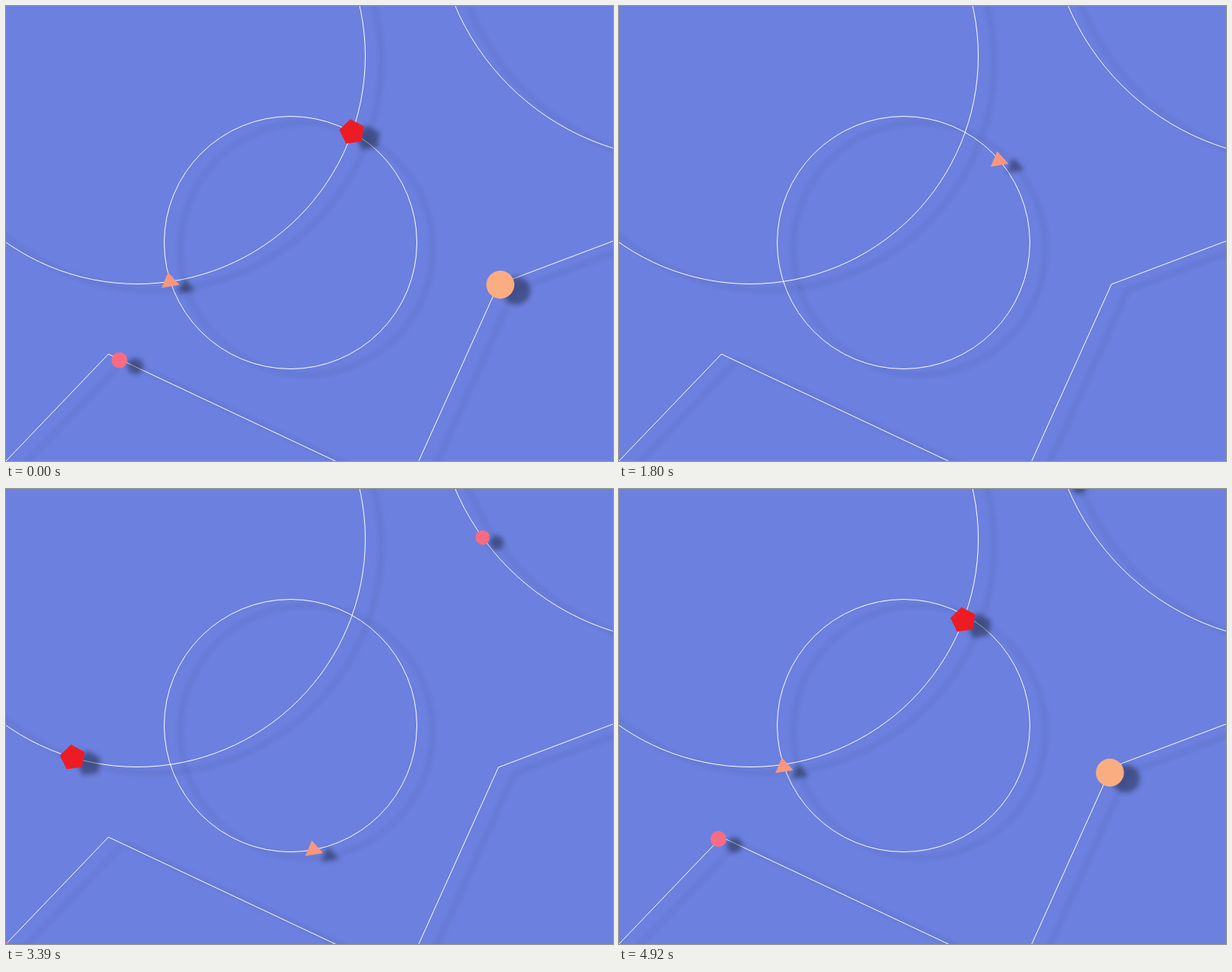
An HTML page with a canvas that plays this animation: 800x600 px, repeating every 4.95 s.

```html
<!DOCTYPE html>
<html lang="en">
<head>
<meta charset="utf-8">
<title>Shapes on paths</title>
<style>
  html, body { margin: 0; width: 100%; height: 100%; overflow: hidden; background: #6b80df; }
  canvas { display: block; }
</style>
</head>
<body>
<canvas width="800" height="600"></canvas>
<script>
const ctx = document.querySelector('canvas').getContext('2d');
const LOOP = 4950, STEP = 30;

const ringA = { x: 375, y: 312, r: 166.5 };
const ringB = { x: 173, y: 66, r: 300.5 };
const ringC = { x: 898.3, y: -130.7, r: 333 };
const leftPath = [[0, 600], [135, 459], [434, 600]];
const rightPath = [[544, 600], [649, 367], [800, 310]];

// Angles in degrees, evenly spaced over one loop
const triangleTurn = [162.1, 230.5, 306.8, 371.5, 432.6, 491.9, 522.1];
const pentagonTurn = [19.5, -36, -112, -183, -247, -303.3, -340.5];

const triangle = [[-2.8, -12], [12, 4.5], [-11.5, 8.5]];
const pentagon = [0, 1, 2, 3, 4].map(i => {
  const a = (i * 72 - 98) * Math.PI / 180;
  return [17.3 * Math.cos(a), 17.3 * Math.sin(a)];
});

// Smooth curve through evenly spaced values
function spline(values, t) {
  const last = values.length - 1;
  const pos = t / LOOP * last, i = Math.floor(pos);
  const u = pos - i, w = 1 - u;
  const slope = j => {
    const a = Math.max(j - 1, 0), b = Math.min(j + 1, last);
    return (values[b] - values[a]) / (b - a);
  };
  return values[i] * w * w * (1 + 2 * u) + values[i + 1] * u * u * (3 - 2 * u)
    + u * w * (slope(i) * w - slope(i + 1) * u);
}

// Steady straight motion: at point a at time t0, at point b at time t1
function glide(a, b, t0, t1, t) {
  const u = (t - t0) / (t1 - t0);
  return [a[0] + (b[0] - a[0]) * u, a[1] + (b[1] - a[1]) * u];
}

function onRing(ring, degrees) {
  const a = degrees * Math.PI / 180;
  return [ring.x + ring.r * Math.cos(a), ring.y + ring.r * Math.sin(a)];
}

// Speeds up slightly, then rests just above the stage
function smallDotAngle(t) {
  const d = Math.min(t, 3780) - 2460;
  return 113.4 + 0.0303 * d + 3.08e-6 * d * d;
}

function setShadow(scale) {
  ctx.shadowColor = 'rgba(0, 0, 0, 0.36)';
  ctx.shadowOffsetX = 21 * scale;
  ctx.shadowOffsetY = 8 * scale;
  ctx.shadowBlur = 6;
}

// Extend the ends so that the shadows run off the stage
function strokePath([a, b, c]) {
  ctx.beginPath();
  ctx.moveTo(...glide(b, a, 0, 1, 1.4));
  ctx.lineTo(...b);
  ctx.lineTo(...glide(b, c, 0, 1, 1.4));
  ctx.stroke();
}

function strokeRing(ring) {
  ctx.beginPath();
  ctx.arc(ring.x, ring.y, ring.r, 0, 2 * Math.PI);
  ctx.stroke();
}

function dot([x, y], r, color) {
  ctx.fillStyle = color;
  ctx.beginPath();
  ctx.arc(x, y, r, 0, 2 * Math.PI);
  ctx.fill();
}

function polygon([x, y], points, color) {
  ctx.fillStyle = color;
  ctx.beginPath();
  points.forEach(([px, py]) => ctx.lineTo(x + px, y + py));
  ctx.fill();
}

function draw(t) {
  const leaving = t < LOOP / 2;

  ctx.shadowColor = 'transparent';
  ctx.fillStyle = '#6b80df';
  ctx.fillRect(0, 0, 800, 600);

  setShadow(1);
  ctx.strokeStyle = '#fff';
  ctx.lineWidth = 1;
  [ringA, ringB, ringC].forEach(strokeRing);
  [leftPath, rightPath].forEach(strokePath);

  polygon(onRing(ringA, spline(triangleTurn, t)), triangle, '#f9967f');
  polygon(onRing(ringB, spline(pentagonTurn, t)), pentagon, '#ed1c24');
  dot(leaving ? glide([149.5, 467], [396.5, 582], 0, 1170, t)
              : glide([54, 544], [131, 461.5], 4050, 4920, t), 10.5, '#f76c82');
  dot(leaving ? glide([651.5, 367.5], [722, 339.5], 0, 450, t)
              : glide([559, 566.5], [647, 374], 4050, 4920, t), 18.5, '#f9ad81');
  setShadow(0.88);
  dot(onRing(ringC, smallDotAngle(t)), 9.5, '#f76c82');
}

const start = performance.now();
function frame() {
  const t = (performance.now() - start) % LOOP;
  draw(Math.floor(t / STEP) * STEP);
  requestAnimationFrame(frame);
}
frame();
</script>
</body>
</html>
```
